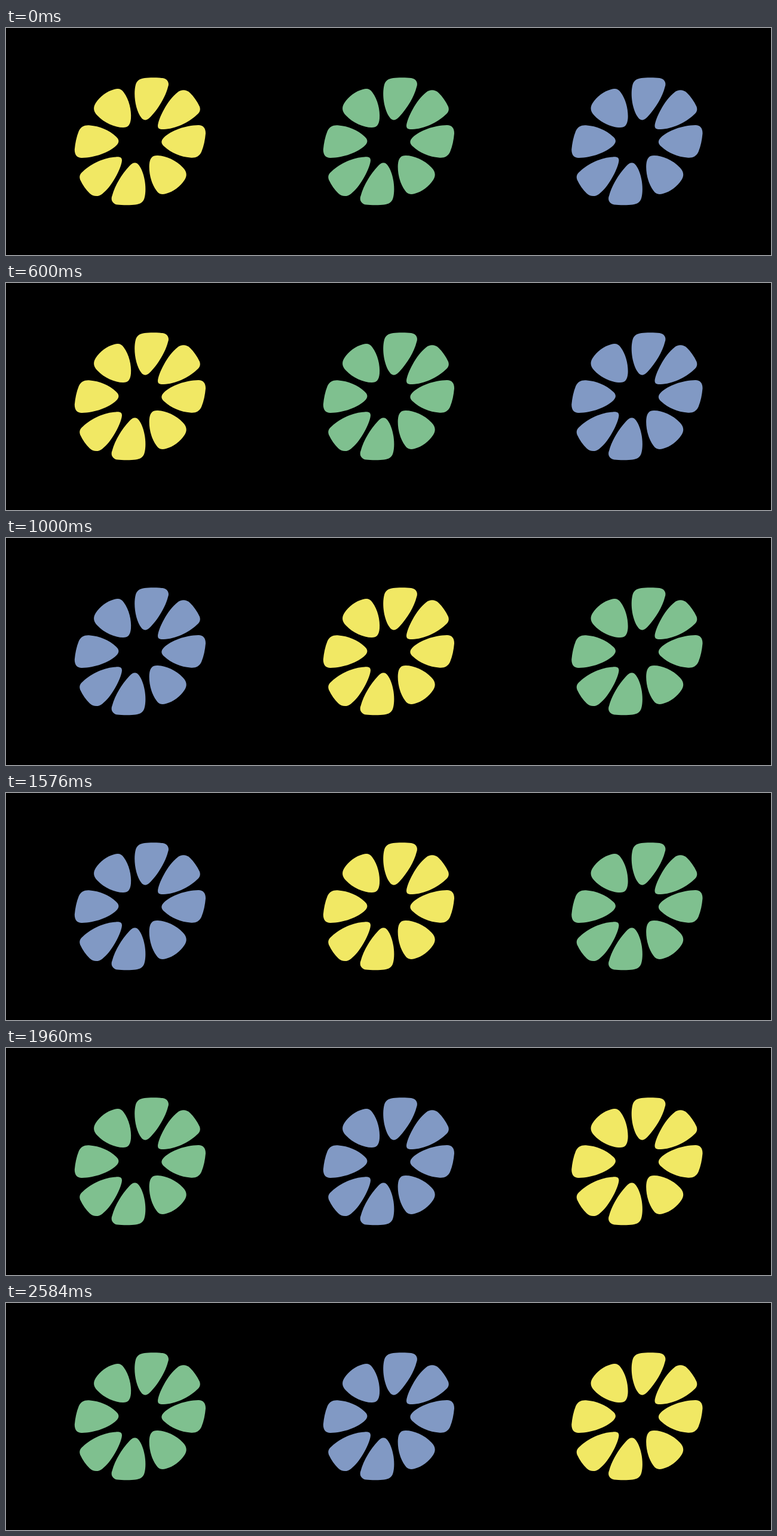
Write an HTML page that moves like this. It is 1280 by 381 pixels and loops after 3 s.

```html
<!DOCTYPE html>
<html lang="en">
<head>
<meta charset="utf-8">
<title>Citrus wheels</title>
<style>
  html, body { margin: 0; width: 100%; height: 100%; overflow: hidden; background: #000; }
  svg { display: block; }
</style>
</head>
<body>
<svg width="1280" height="381" viewBox="0 0 1280 381">
  <defs>
    <path id="top" d="M232 84C238 83 255 83 262 84C270 85 274 92 271 99C267 115 256 134 242 149C236 156 230 156 226 150C217 138 212.5 112 217 95C219 88 224 85 232 84Z"/>
    <path id="upperRight" d="M254 164C255 152 270 121 287 108C293 103 302 103 308 109C314 115 320 123 324 132C326 138 324 142 319 146C305 159 283 169.5 264 170C257 170.3 254 169 254 164Z"/>
    <path id="right" d="M264 184C276 172 300 163.5 322 163C330 163 334 168 334 177C333 188 331 198 327 208C323 216 317 218.5 308 217.5C293 216.5 276 209.5 265 199C259 194 259 189 264 184Z"/>
    <path id="upperLeft" d="M197 108C206 120 210 138 209 152C208 163 204 167 196 167C182 167 164 159 153 147C146 140 145.5 133 150 126C157 115 169 106 181 103C188 101 193 102 197 108Z"/>
    <g id="wheel">
      <use href="#top"/><use href="#top" transform="rotate(180 224.3 190.3)"/>
      <use href="#upperRight"/><use href="#upperRight" transform="rotate(180 224 193.2)"/>
      <use href="#right"/><use href="#right" transform="rotate(180 224.4 190.5)"/>
      <use href="#upperLeft"/><use href="#upperLeft" transform="rotate(180 224.4 190.5)"/>
    </g>
  </defs>
  <use class="wheel" href="#wheel"/>
  <use class="wheel" href="#wheel" x="416"/>
  <use class="wheel" href="#wheel" x="831.5"/>
</svg>
<script>
  const colors = ['#f1e864', '#7fc08f', '#8199c4'];
  const wheels = document.querySelectorAll('.wheel');
  const start = performance.now();

  function draw() {
    const t = (performance.now() - start) % 3000;
    const step = t < 1000 ? 0 : t < 1960 ? 1 : 2;
    wheels.forEach((wheel, i) => wheel.setAttribute('fill', colors[(i - step + 3) % 3]));
    requestAnimationFrame(draw);
  }
  draw();
</script>
</body>
</html>
```
